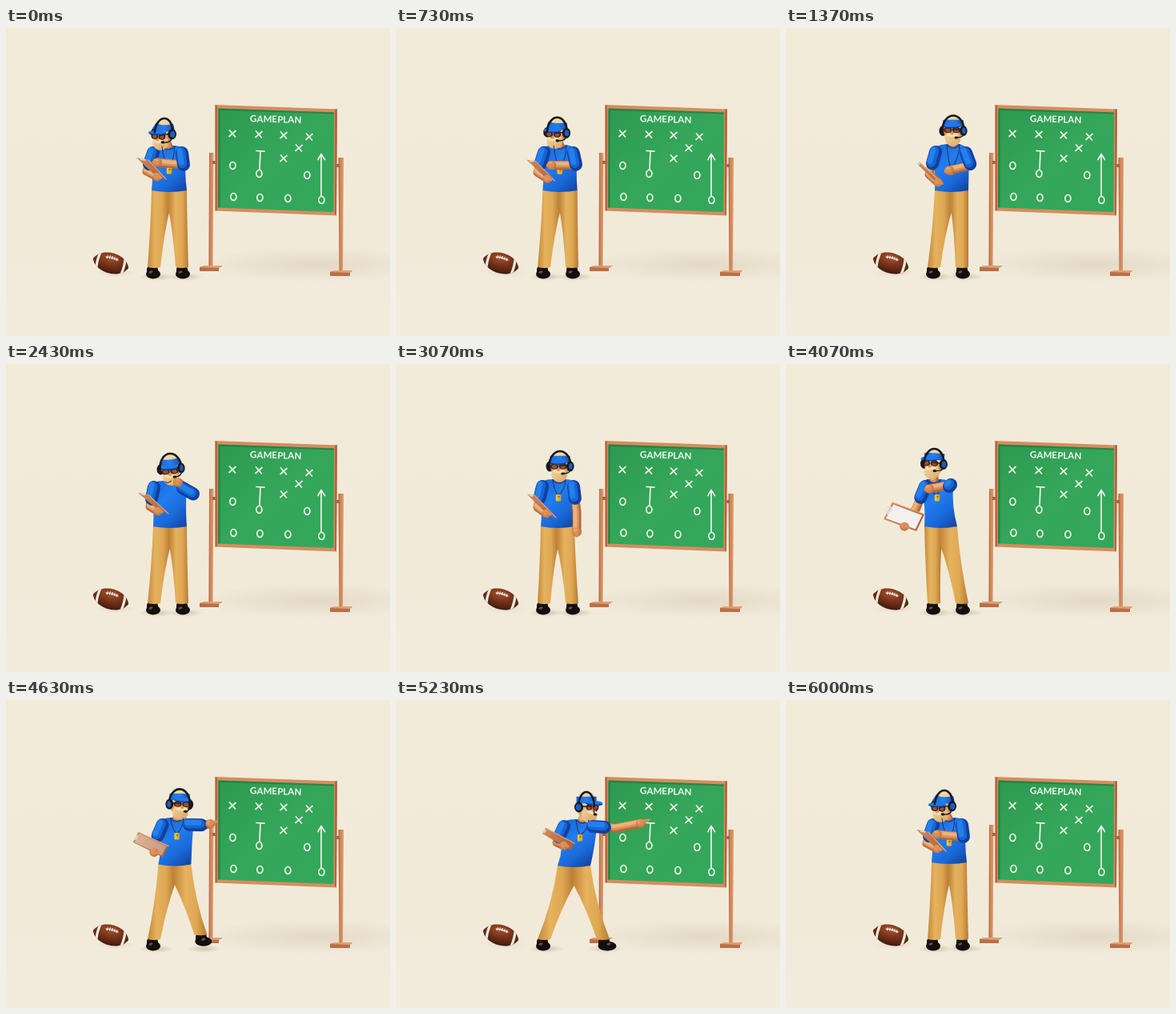
Write an HTML page with a canvas that moves like this. It is 480x385 px and loops after 6.03 s.

```html
<!DOCTYPE html>
<html lang="en">
<head>
<meta charset="utf-8">
<title>Gameplan</title>
<style>
html, body { margin: 0; width: 100%; height: 100%; overflow: hidden; background: #f1ebd9; }
svg, canvas { position: absolute; left: 0; top: 0; width: 480px; height: 385px; display: block; }
text { font: 700 11.6px Lato, "Open Sans", sans-serif; fill: #f4f8ee; }
</style>
</head>
<body>
<svg viewBox="0 0 480 385">
  <defs>
    <linearGradient id="wall" x2="0" y2="1">
      <stop stop-color="#f1ebd8"/><stop offset=".7" stop-color="#f1ead9"/><stop offset="1" stop-color="#f3ecdd"/>
    </linearGradient>
    <radialGradient id="shade">
      <stop stop-color="#d8cab4" stop-opacity=".55"/><stop offset="1" stop-color="#d8cab4" stop-opacity="0"/>
    </radialGradient>
    <linearGradient id="wood">
      <stop stop-color="#a9613d"/><stop offset=".35" stop-color="#cf8558"/><stop offset="1" stop-color="#dd9a6e"/>
    </linearGradient>
    <linearGradient id="chalkboard" x2="1" y2="1">
      <stop stop-color="#2c9a50"/><stop offset=".5" stop-color="#35a65a"/><stop offset="1" stop-color="#32a75a"/>
    </linearGradient>
    <radialGradient id="leather" cx=".45" cy=".25" r=".75">
      <stop stop-color="#a1522f"/><stop offset=".5" stop-color="#743217"/><stop offset="1" stop-color="#421a10"/>
    </radialGradient>
    <clipPath id="ballShape"><path id="ballPath" d="M-23 0C-16-17 16-17 23 0C16 17-16 17-23 0Z"/></clipPath>
  </defs>
  <rect width="480" height="385" fill="url(#wall)"/>
  <ellipse cx="385" cy="296" rx="150" ry="22" fill="url(#shade)"/>
  <ellipse cx="136" cy="306" rx="26" ry="5" fill="url(#shade)"/>

  <g id="stand">
    <path d="M254 156h5.500l-1 144h-5z" fill="url(#wood)"/>
    <path d="M242 299l6-2h23l-5 3v4h-24z" fill="#b96f48"/>
    <path d="M242 299l6-2h23l-5 3z" fill="#dfa077"/>
    <path d="M415.500 162h6.500l-1 144h-4.500z" fill="url(#wood)"/>
    <path d="M405 305l6-2h22l-3 3v4h-25z" fill="#b96f48"/>
    <path d="M405 305l6-2h22l-3 3z" fill="#dfa077"/>
    <path d="M258 166h5v4h-5zM412 170h5v4h-5z" fill="#a8613e"/>
  </g>
  <path d="M261.500 96L414 101.500L413 234.500L261.500 228.500Z" fill="#d58d60"/>
  <path d="M261.500 96L264 97L264 228L261.500 228.500ZM411 101.500l3 0l-1 133l-2-2z" fill="#b06840"/>
  <path d="M265.500 100.500L410 105.500L409.500 230L265 224.500Z" fill="url(#chalkboard)"/>
  <path d="M265.500 100.500L410 105.500v2L267.500 103V224.500H265Z" fill="#22743b" opacity=".65"/>
  <text x="305" y="117.500" transform="rotate(1.300 305 117)" rotate="-3 2 0 -2 3 0 -2 2">GAMEPLAN</text>
  <g id="marks" fill="none" stroke="#eef7e8" stroke-width="1.7" stroke-linecap="round" stroke-linejoin="round">
    <path d="M317 177L318 154M313 153.500L323 154.200M394 210V158M390 164.500L394 157.500L398.500 164.500"/>
  </g>

  <g transform="translate(131 294) rotate(15)">
    <path d="M-23 0C-16-17 16-17 23 0C16 17-16 17-23 0Z" fill="url(#leather)"/>
    <g clip-path="url(#ballShape)" fill="none" stroke="#f0e9e1">
      <path d="M-15-14Q-19 0-15 14M15-14Q19 0 15 14" stroke-width="3.200"/>
      <path d="M-8-6Q0-8 8-6" stroke-width="1.500"/>
      <path d="M-6-8.500v4M-3-9v4M0-9.300v4M3-9v4M6-8.500v4" stroke-width="1.200"/>
    </g>
  </g>
</svg>
<canvas></canvas>

<script>
const LOOP = 6030;
const canvas = document.querySelector('canvas');
const ctx = canvas.getContext('2d');
const ratio = window.devicePixelRatio || 1;
canvas.width = 480 * ratio;
canvas.height = 385 * ratio;

// Chalk crosses and rings
const marks = document.getElementById('marks');
function mark(d) {
  const p = document.createElementNS('http://www.w3.org/2000/svg', 'path');
  p.setAttribute('d', d);
  marks.append(p);
}
[[283, 132], [316, 133], [347, 134], [379, 136], [366, 150], [347, 163]].forEach(([x, y]) =>
  mark(`M${x - 3.5} ${y - 4}l7 8m0.5-7.500l-8 7`));
[[283, 172], [316, 182], [376, 184], [284, 211], [317, 212], [352, 213], [394, 215]].forEach(([x, y]) =>
  mark(`M${x} ${y - 4.5}a3.600 4.500 0 1 0 .8 0`));

// [time, pose]: write, look up, whistle, stand, gesture, point
const KEYS = [[0, 0], [420, 0], [1200, 1], [1470, 1], [2250, 2], [2520, 2], [2980, 3],
  [3200, 3], [3930, 4], [4200, 4], [4960, 5], [5370, 5], [5970, 0], [LOOP, 0]];

// x, y, yaw, pitch, tilt
const HEAD = [
  [197, 131, -.6, 4, .08], [209, 127.5, -.12, -1, 0], [206, 130, -.12, 3, -.08],
  [205, 127, -.15, 0, 0], [185, 124, -.42, -1, .05], [238, 133, .75, 0, 0]];
// neck, left shoulder, right shoulder, hem left, hem right, hem y
const TORSO = [
  [203, 148, 184, 156, 220, 156, 182, 226, 204], [209, 146, 187, 155, 225, 156, 186, 228, 204],
  [207, 147, 185, 154, 221, 155, 184, 226, 204], [204, 145, 183, 153, 222, 153, 181, 223, 204],
  [185, 145, 174, 153, 204, 153, 173, 214, 204], [233, 150, 210, 158, 246, 158, 202, 243, 208]];
// elbow, hand
const ARM_L = [
  [176, 179, 189, 186], [179, 183, 190, 193], [180, 178, 190, 184],
  [177, 179, 188, 187], [163, 180, 148, 203], [201, 178, 210, 182]];
const ARM_R = [
  [222, 171, 189, 168], [231, 172, 204, 178], [235, 163, 215, 148],
  [226, 185, 226, 210], [206, 151, 179, 156], [275, 160, 306, 154]];
// corners, the clip sits between the last and the first
const BOARD = [
  [178, 165, 200, 189, 184, 182, 163, 162], [167, 168, 196, 195, 192, 197, 164, 170],
  [177, 163, 203, 187, 191, 183, 165, 161], [173, 164, 200, 192, 189, 188, 164, 163],
  [133, 173, 173, 188, 163, 209, 122, 194], [187, 160, 223, 179, 218, 188, 183, 167]];
// whistle x, whistle y, stride, pointing, paper shown
const EXTRA = [
  [204, 178, 0, 0, 0], [206, 179, 0, 0, 0], [210, 147, 0, 0, 0],
  [203, 167, 0, 0, 0], [189, 167, 0, 0, 1], [230, 172, 1, 1, 0]];

const SKIN = ['#b9683a', '#d98f57', '#eab27c'];
const BLUE = ['#123f9e', '#1765d2', '#2380ee'];

function poseAt(t) {
  let n = 0;
  while (n < KEYS.length - 2 && t >= KEYS[n + 1][0]) n++;
  const [t0, a] = KEYS[n], [t1, b] = KEYS[n + 1];
  const u = (t - t0) / (t1 - t0);
  const k = u * u * (3 - 2 * u);
  return table => table[a].map((v, i) => v + (table[b][i] - v) * k);
}

function fade(x0, y0, x1, y1, ...colors) {
  const g = ctx.createLinearGradient(x0, y0, x1, y1);
  colors.forEach((c, i) => g.addColorStop(i / (colors.length - 1), c));
  return g;
}

function oval(x, y, rx, ry, fill, turn = 0) {
  ctx.beginPath();
  ctx.ellipse(x, y, rx, ry, turn, 0, 7);
  ctx.fillStyle = fill;
  ctx.fill();
}

function line(width, color, draw) {
  ctx.beginPath();
  draw();
  ctx.lineWidth = width;
  ctx.strokeStyle = color;
  ctx.stroke();
}

// Rounded limb, lit from the upper left
function tube(points, width, tones) {
  tones.forEach((color, i) => {
    const d = -i * width * .09;
    line(width * (1 - i * .29), color, () => {
      points.forEach(([x, y]) => ctx.lineTo(x + d, y + d));
    });
  });
}

function ball(x, y, r, tones) {
  const g = ctx.createRadialGradient(x - r * .4, y - r * .5, 0, x, y, r * 1.15);
  tones.forEach((c, i) => g.addColorStop(1 - i / 2, c));
  oval(x, y, r, r * .92, g);
}

function shoe(x, lift, side) {
  const y = 306 - lift;
  ctx.beginPath();
  ctx.roundRect(x - 8 - side, y - 8, 14, 12, 4);
  ctx.fillStyle = '#1b1413';
  ctx.fill();
  oval(x + side * 2, y + 1.5, 9 + side * 2.5, 6, '#120e0e');
  oval(x - 3 + side * 7, y - 1, 2.6, 1.5, '#5d5450', -.3);
}

function leg(outer, middle, y, ankle, lift, dir) {
  const foot = 299 - lift;
  ctx.beginPath();
  ctx.moveTo(outer, y - 1);
  ctx.quadraticCurveTo((outer * 3 + ankle + dir * 8) / 4, y + 45, ankle + dir * 8, foot);
  ctx.quadraticCurveTo(ankle, foot + 2, ankle - dir * 8, foot);
  ctx.quadraticCurveTo((middle + ankle - dir * 8) / 2 + dir, y + 52, middle - dir, y + 22);
  ctx.lineTo(middle - dir * 2, y - 1);
  ctx.closePath();
  const lo = Math.min(outer, ankle - 8, middle), hi = Math.max(outer, ankle + 8, middle);
  ctx.fillStyle = fade(lo, 0, hi, 0, '#c48737', '#e5b25f', '#dfa853', '#b67a34');
  ctx.fill();
}

function legs([, , , , , , left, right, y], stride) {
  const step = 220 + stride * 39;
  const lift = stride * (1 - stride) * 24;
  const middle = (left + right) / 2;
  const g = ctx.createRadialGradient(0, 0, 0, 0, 0, 1);
  g.addColorStop(0, 'rgba(125,95,65,.28)');
  g.addColorStop(1, 'rgba(125,95,65,0)');
  [184, step].forEach(x => {
    ctx.save();
    ctx.translate(x + 4, 311);
    ctx.scale(22, 5);
    oval(0, 0, 1, 1, g);
    ctx.restore();
  });
  shoe(184, 0, 0);
  shoe(step + 1 + stride * 2, lift, stride);
  leg(left, middle, y, 185, 0, -1);
  leg(right, middle, y, step, lift, 1);
}

function shirt([nx, ny, lx, ly, rx, ry, left, right, hem]) {
  ctx.beginPath();
  ctx.moveTo(nx - 7, ny - 1);
  ctx.quadraticCurveTo(lx - 2, ly - 9, lx - 5, ly);
  ctx.quadraticCurveTo(lx + 1, ly + 24, left, hem - 1);
  ctx.quadraticCurveTo((left + right) / 2, hem + 3, right, hem - 1);
  ctx.quadraticCurveTo(rx + 3, ry + 24, rx + 5, ry);
  ctx.quadraticCurveTo(rx + 2, ry - 9, nx + 7, ny - 1);
  ctx.closePath();
  ctx.fillStyle = fade(lx - 4, ly, right, hem, '#1868d8', '#217df0', '#1a69d8', '#123f9f');
  ctx.fill();
}

function arm(sx, sy, [ex, ey, hx, hy]) {
  const d = Math.hypot(ex - sx, ey - sy) || 1;
  const k = Math.min(1, 15 / d);
  tube([[sx, sy], [ex, ey], [hx, hy]], 11, SKIN);
  tube([[sx, sy], [sx + (ex - sx) * k, sy + (ey - sy) * k]], 16, BLUE);
}

function clipboard(c, paper) {
  const at = (u, v) => [0, 1].map(i =>
    (c[i] * (1 - u) + c[2 + i] * u) * (1 - v) + (c[6 + i] * (1 - u) + c[4 + i] * u) * v);
  const quad = (u0, u1, v0, v1, fill) => {
    ctx.beginPath();
    [[u0, v0], [u1, v0], [u1, v1], [u0, v1]].forEach(([u, v]) => ctx.lineTo(...at(u, v)));
    ctx.closePath();
    ctx.fillStyle = fill;
    ctx.fill();
  };
  quad(0, 1, 0, 1, fade(c[6], c[7], c[2], c[3], '#d28a5b', '#a95f39'));
  line(1.2, '#dfa27b', () => { ctx.moveTo(c[0], c[1]); ctx.lineTo(c[2], c[3]); });
  ctx.globalAlpha = paper;
  quad(.05, .95, .08, .92, '#f3f0ed');
  ctx.globalAlpha = 1;
  line(2.5, '#d9d3cf', () => { ctx.moveTo(...at(.03, .35)); ctx.lineTo(...at(.03, .65)); });
  if (paper > .5) {
    const [x, y] = at(0, .4);
    line(1.5, '#e6e1dc', () => ctx.arc(x, y, 3.5, 0, 7));
  }
}

function head([x, y, yaw, pitch, tilt]) {
  const s = Math.sin(yaw), c = Math.cos(yaw);
  const near = yaw > 0 ? -1 : 1;
  const cup = side => {
    const cx = side * 13 * c;
    oval(cx, 1, 4.5 + Math.abs(s) * 1.5, 6.5, '#17191f');
    if (side === near) oval(cx + near * .5, 1, 2 + Math.abs(s) * 2, 4, '#1c5dbb');
  };
  ctx.save();
  ctx.translate(x, y);
  ctx.rotate(tilt);
  cup(-near);
  oval(0, -1, 12, 17, fade(-12, 0, 12, 0, '#d78e56', '#e8ae78', '#c57a48'));
  oval(0, -9, 11.5, 10, fade(-10, -18, 10, 0, '#f5e2ae', '#e5c687'));

  // Beard, nose and glasses
  oval(s * 5, 11 + pitch * .4, 10, 9.5, fade(-8, 3, 9, 20, '#f2d59c', '#d8a766'));
  oval(s * 10, 7 + pitch, 6 * c + 1, 2.4, '#f4dfb2');
  oval(s * 13, 4 + pitch, 2.6, 3, '#dc945f');
  [-1, 1].forEach(side => {
    const gx = s * 11 + side * 5.5 * c;
    oval(gx, 1 + pitch, 4.8 * c + .4, 3.8, '#3b211d');
    oval(gx, 1.4 + pitch, 3.2 * c, 2.4, '#9a4f2c');
  });
  line(1.5, '#33201d', () => { ctx.moveTo(s * 8, pitch); ctx.lineTo(near * 11 * c, 0); });

  // Visor cap
  ctx.lineCap = 'butt';
  line(8.5, fade(-12, 0, 12, 0, '#1a6be0', '#247ff0', '#1553b8'), () => {
    ctx.moveTo(-12.5, -8);
    ctx.quadraticCurveTo(s * 6, -8 + pitch * 1.3, 12.5, -8);
  });
  ctx.lineCap = 'round';
  const vy = -4.5 + pitch * 1.2;
  oval(s * 14, vy + .8, 11, 2.8, '#113f94', s * .12);
  oval(s * 14, vy - .4, 11, 2.3, '#2079e9', s * .12);

  // Headset
  line(2.6, '#1a191c', () => ctx.ellipse(0, 0, 13.5 * c, 18, 0, Math.PI, Math.PI * 2));
  cup(near);
  const mx = 5 + s * 9, my = 10 + pitch * .5;
  line(1.3, '#1b1a1d', () => {
    ctx.moveTo(13 * c, 5);
    ctx.quadraticCurveTo(13 * c, my, mx, my);
  });
  oval(mx, my, 2.4, 1.6, '#19181a');
  ctx.restore();
}

function whistle(x, y, nx, ny) {
  line(1.1, '#26385f', () => {
    ctx.moveTo(nx - 8, ny);
    ctx.quadraticCurveTo(nx - 6, (ny + y) / 2 + 4, x, y - 3);
    ctx.quadraticCurveTo(nx + 7, (ny + y) / 2 + 2, nx + 8, ny);
  });
  ctx.beginPath();
  ctx.roundRect(x - 3.2, y - 4, 6.5, 8.5, 1.6);
  ctx.fillStyle = fade(x - 3, y, x + 3, y, '#f2cb3d', '#d4a21f');
  ctx.fill();
  oval(x + .5, y - 1, 1.2, 1, '#8e6a17');
}

function draw(t) {
  const pose = poseAt(t);
  const torso = pose(TORSO), left = pose(ARM_L), right = pose(ARM_R);
  const [wx, wy, stride, pointing, paper] = pose(EXTRA);
  const [nx, ny, lx, ly, rx, ry] = torso;
  const face = pose(HEAD);
  if (t < 420) right[2] += Math.sin(t / 420 * Math.PI * 4) * 1.5;

  ctx.setTransform(ratio, 0, 0, ratio, 0, 0);
  ctx.clearRect(0, 0, 480, 385);
  ctx.lineCap = ctx.lineJoin = 'round';

  legs(torso, stride);
  shirt(torso);
  tube([[nx, ny], [face[0], face[1] + 8]], 11, SKIN);
  line(2, '#1450b4', () => {
    ctx.moveTo(nx - 8, ny);
    ctx.quadraticCurveTo(nx, ny + 8, nx + 8, ny);
  });
  arm(lx, ly, left);
  clipboard(pose(BOARD), paper);
  ball(left[2], left[3], 5.6, SKIN);
  line(3, SKIN[1], () => {
    ctx.moveTo(left[2] - 2, left[3] - 2);
    ctx.lineTo(left[2] + 5, left[3] + 1);
  });
  head(face);
  whistle(wx, wy, nx, ny);
  arm(rx, ry, right);

  const [ex, ey, hx, hy] = right;
  const turn = Math.atan2(hy - ey, hx - ex);
  ball(hx, hy, 6, SKIN);
  const reach = 5 + pointing * 5;
  line(3.4, SKIN[1], () => {
    ctx.moveTo(hx, hy - pointing * 2);
    ctx.lineTo(hx + Math.cos(turn) * reach, hy + Math.sin(turn) * reach - pointing * 2);
  });
}

function frame() {
  draw(performance.now() % LOOP);
  requestAnimationFrame(frame);
}
frame();
</script>
</body>
</html>
```
